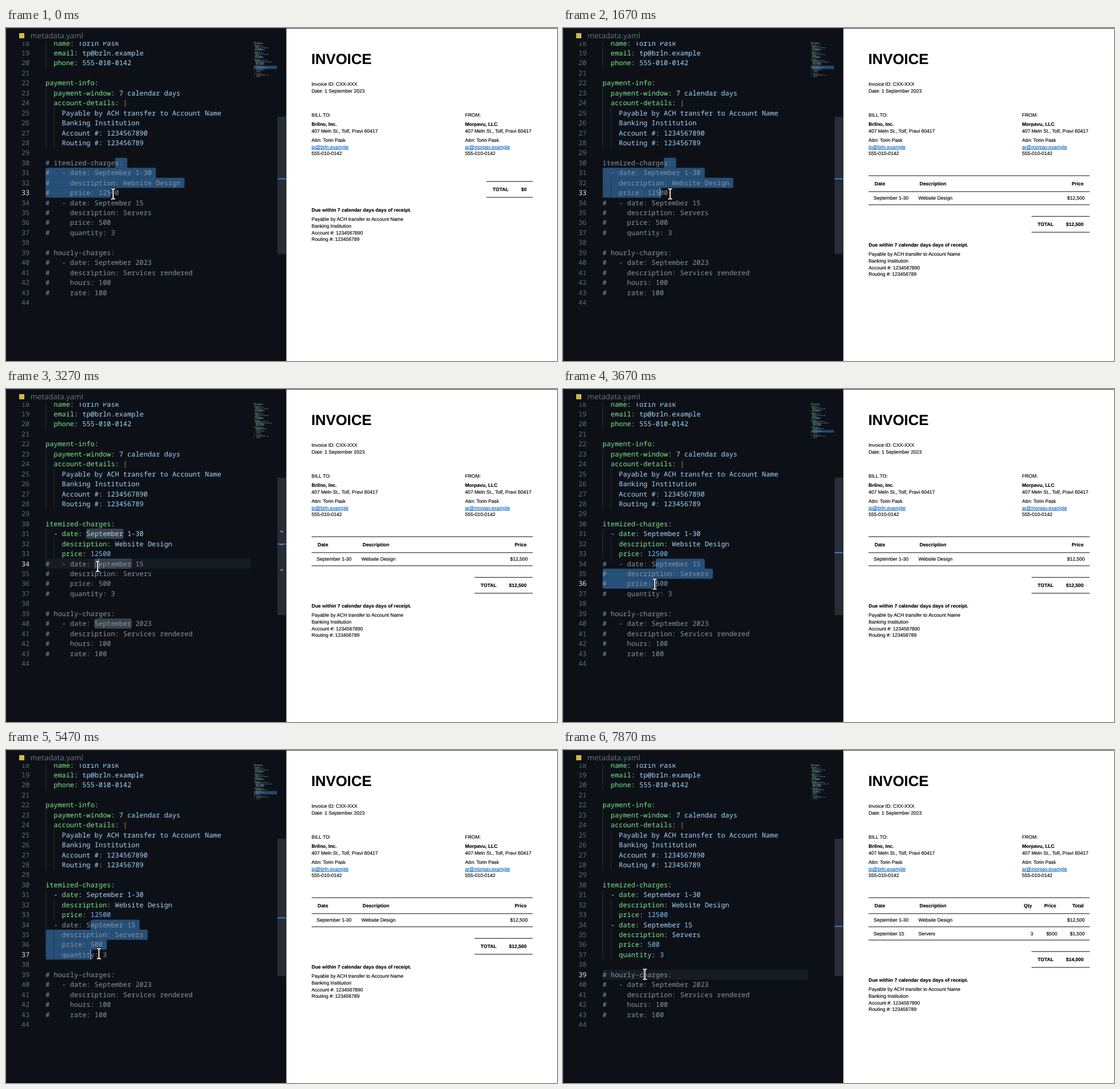
Write an HTML page that moves like this. It is 962 px wide and 582 px high and loops after 8 s.

```html
<!DOCTYPE html>
<html lang="en">
<head>
<meta charset="utf-8">
<title>Invoice from YAML</title>
<style>
  html, body { margin: 0; width: 100%; height: 100%; overflow: hidden; background: #0d1117; }
  svg { display: block; width: 962px; height: 582px; }
  text { white-space: pre; text-rendering: geometricPrecision; }
  .code { font: 500 11.9px "Noto Sans Mono", "DejaVu Sans Mono", monospace; fill: #c9d1d9; }
  .title { font: 13.2px "Open Sans", "Noto Sans", sans-serif; fill: #6b7482; }
  .doc { font: 8.5px "Liberation Sans", Arial, sans-serif; fill: #000; stroke: #000; stroke-width: .15; }
  .b { font-weight: bold; }
  .h1 { font-size: 25.6px; font-weight: bold; }
  .link { fill: #0563c1; stroke: #0563c1; text-decoration: underline; }
</style>
</head>
<body>
<svg id="stage" viewBox="0 0 962 582">
  <rect width="490" height="582" fill="#0d1117"/>
  <g id="editor"></g>
  <rect width="489" height="24" fill="#0d1117"/>
  <rect width="1" height="582" fill="#20252d"/>
  <rect width="489" height="1" fill="#20252d"/>
  <rect x="23" y="9" width="9" height="9" fill="#d6b84a"/>
  <text class="title" x="42.6" y="17.6">metadata.yaml</text>
  <rect x="489.5" width="473" height="582" fill="#fff"/>
  <rect x="489" width="473" height="1" fill="#30363d"/>
  <g id="invoice"></g>
  <g id="mouse" fill="none" stroke-linecap="square"></g>
</svg>
<script>
const LOOP = 8000, STEP = 1000 / 15;
const X0 = 69, CW = 7.14, LH = 17.44, TOP = 35, FIRST = 18, LAST = 44;
const NAME = 'Torin Pask', PHONE = '555-010-0142', STREET = '407 Meln St., Tolf, Pravi 60417';
const CLIENT_MAIL = 'tp@brln.example', OWN_MAIL = 'ar@morpav.example';
const PAYMENT = ['Payable by ACH transfer to Account Name', 'Banking Institution',
  'Account #: 1234567890', 'Routing #: 123456789'];

// Lines above the viewport, seen only in the minimap
const HIDDEN = ['---', 'invoice-id: CXX-XXX', 'date: 1 September 2023', '', 'company-info:',
  '  company: Morpavu, LLC', '  address: |', '    ' + STREET, '  name: ' + NAME,
  '  email: ' + OWN_MAIL, '  phone: ' + PHONE, '', 'client-info:', '  company: Brilno, Inc.',
  '  address: |', '    ' + STREET, '  attention:'];
const CODE = ['  name: ' + NAME, '  email: ' + CLIENT_MAIL, '  phone: ' + PHONE, '',
  'payment-info:', '  payment-window: 7 calendar days', '  account-details: |',
  ...PAYMENT.map(s => '    ' + s), '',
  'itemized-charges:', '  - date: September 1-30', '    description: Website Design', '    price: 12500',
  '  - date: September 15', '    description: Servers', '    price: 500', '    quantity: 3', '',
  'hourly-charges:', '  - date: September 2023', '    description: Services rendered',
  '    hours: 100', '    rate: 100', ''];

// First line, last line, time uncommented, time recoloured
const BLOCKS = [[30, 33, 1600, 1800], [34, 37, 5470, 5530], [39, 43, Infinity, Infinity]];
const BLINKS = [470, 930, 1400, 2070, 2600, 4670, 5130, 5930, 6470, 6930, 7400];
const PATH = [[0, 187, 290], [2530, 187, 290], [2930, 160, 310], [3400, 160, 310], [3670, 160, 341],
  [3870, 160, 352], [4270, 161, 356], [4330, 162.3, 356], [7070, 162.3, 356], [7270, 154, 371], [7730, 143, 392]];

const $ = id => document.getElementById(id);
const xAt = col => X0 + col * CW;
const topAt = n => TOP + (n - 19) * LH;
const mapY = n => 23.9 + (n - 1) * 1.45;
const rulerY = n => 262.6 + (n - 33) * 7.45;
const rect = (x, y, w, h, fill, more = '') =>
  `<rect x="${x}" y="${y}" width="${w}" height="${h}" fill="${fill}" ${more}/>`;
const text = (x, y, s, cls, more = '') => `<text class="${cls}" x="${x}" y="${y}" ${more}>${s}</text>`;
const span = (fill, s) => s ? `<tspan fill="${fill}">${s}</tspan>` : '';

function mouseAt(t) {
  t = Math.floor(t / STEP + 0.06) * STEP + 4;
  const i = PATH.findIndex(p => p[0] > t);
  if (i < 0) return PATH[PATH.length - 1].slice(1);
  const [a, b] = [PATH[i - 1], PATH[i]], k = (t - a[0]) / (b[0] - a[0]);
  return [a[1] + (b[1] - a[1]) * k, a[2] + (b[2] - a[2]) * k];
}

// Selection as [start line, start column, caret line, caret column]
function selectionAt(t) {
  if (t < 1600) return [30, 17, 33, 16];
  if (t < 3070) return [30, 15, 33, 14];
  if (t < 3470) return [34, 13, 34, 13];
  if (t < 5470) return [34, 13, 19 + Math.floor((mouseAt(t)[1] - TOP) / LH), 13];
  if (t < 7870) return [34, 11, 37, 11];
  return [39, 10, 39, 10];
}

function lineAt(n, t) {
  if (n < FIRST) return { s: HIDDEN[n - 1] };
  const s = CODE[n - FIRST], block = BLOCKS.find(b => n >= b[0] && n <= b[1]);
  if (!block) return { s };
  return { s: t < block[2] ? '# ' + s : s, grey: t < block[3], off: t < block[2] };
}

function tokens({ s, grey }) {
  if (grey) return [['#8b949e', s]];
  const [, pad, dash = '', key = '', rest] = s.match(/^(\s*)(- )?([\w-]+:)?(.*)$/);
  const tint = rest.trim() === '|' ? '#ff7b72' : key && /^ \d+$/.test(rest) ? '#79c0ff' : '#a5d6ff';
  return [['#c9d1d9', pad + dash], ['#7ee787', key.slice(0, -1)], ['#c9d1d9', key.slice(-1)], [tint, rest]];
}

function rounded(x, y, r, h, [tl, tr, br, bl]) {
  const b = y + h;
  return `<path fill="#264f78" d="M${x + tl} ${y}H${r - tr}Q${r} ${y} ${r} ${y + tr}V${b - br}` +
    `Q${r} ${b} ${r - br} ${b}H${x + bl}Q${x} ${b} ${x} ${b - bl}V${y + tl}Q${x} ${y} ${x + tl} ${y}Z"/>`;
}

function selection([l0, c0, l1, c1], t) {
  const rows = [];
  for (let n = l0; n <= l1; n++) {
    const s = lineAt(n, t).s;
    rows.push({ n, s, from: n === l0 ? c0 : 0, to: n === l1 ? c1 : s.length + 1 });
  }
  return rows.map(({ n, s, from, to }, i) => {
    const up = rows[i - 1], down = rows[i + 1], r = 3;
    const corners = [!up || from < up.from, !up || to > up.to, !down || to > down.to, !down].map(c => c ? r : 0);
    let out = rounded(xAt(from), topAt(n), xAt(to), LH + (down ? 0.3 : 0), corners);
    for (let c = from; c < Math.min(to, s.length); c++)
      if (s[c] === ' ') out += rect(xAt(c) + 3, topAt(n) + 8.8, 1.2, 1.2, '#45688c');
    return out;
  }).join('');
}

function minimap(t, [l0, , l1], hasRange) {
  let out = hasRange ? rect(433, mapY(l0), 40, (l1 - l0 + 1) * 1.45, '#234a70') : '';
  for (let n = 1; n < LAST; n++) {
    let col = 0;
    for (const [fill, s] of tokens(lineAt(n, t))) {
      for (const m of s.matchAll(/\S+/g))
        out += rect(433 + (col + m.index) * 0.72, mapY(n) + 0.2, m[0].length * 0.72, 0.95, fill, 'opacity=".5"');
      col += s.length;
    }
  }
  return out;
}

function editor(t) {
  const sel = selectionAt(t), [l0, c0, l1, c1] = sel;
  const hasRange = l0 !== l1 || c0 !== c1;
  let out = hasRange ? '' : rect(X0, topAt(l1), 358.5, LH, '#171c24');
  let rows = '', guides = '';
  for (let n = FIRST; n <= LAST; n++) {
    const line = lineAt(n, t), y = topAt(n) + 13;
    rows += text(41.2, y, span(n === l1 ? '#e6edf3' : '#636b76', String(n)), 'code', 'text-anchor="end"');
    rows += text(X0, y, tokens(line).map(k => span(...k)).join(''), 'code');
    if (!line.off)
      for (let c = 0; c < line.s.search(/\S|$/); c += 2)
        guides += rect(xAt(c), topAt(n), 1, LH, '#2a3038');
  }
  if (hasRange) out += selection(sel, t);
  out += guides;
  const words = t >= 3270 && t < 3470 ? [[31, 10], [34, 12], [40, 12]] : [];
  for (const [n, c] of words)
    out += rect(xAt(c), topAt(n) + 0.5, 9 * CW, LH - 1, '#3a4149', 'stroke="#4b535d" stroke-width=".8" rx="2"');
  out += rows;
  if (BLINKS.filter(b => b <= t).length % 2)
    out += rect(xAt(c1) - 0.4, topAt(l1), 1.6, LH, '#58a6ff');
  out += minimap(t, sel, hasRange) + rect(474, 155, 14.5, 240, '#272c35');
  for (const [n] of words) out += rect(479, rulerY(n), 5, 3, '#6e7681');
  return out + rect(474, rulerY(l1), 14.5, 2, '#3f7bcb');
}

function invoice(stage) {
  const right = 'text-anchor="end"';
  const doc = (x, y, s, cls = '', more) => text(x, y, s, 'doc ' + cls, more);
  const rule = (x, y) => rect(x, y, 919.5 - x, 1.1, '#222');
  const party = (x, head, firm, mail) => [[154.8, head], [171, firm, 'b'], [182.8, STREET],
    [199, 'Attn: ' + NAME], [210.8, mail, 'link'], [222.4, PHONE]]
    .map(([y, s, cls]) => doc(x, y, s, cls)).join('');

  let out = doc(533, 63.4, 'INVOICE', 'h1') + doc(533.5, 101, 'Invoice ID: CXX-XXX') +
    doc(533.5, 112.6, 'Date: 1 September 2023') +
    party(533.5, 'BILL TO:', 'Brilno, Inc.', CLIENT_MAIL) + party(801.5, 'FROM:', 'Morpavu, LLC', OWN_MAIL);

  if (stage) {
    out += [257.6, 285.4, 308.4].map(y => rule(533.5, y)).join('');
    out += doc(544, 275, 'Date', 'b') + doc(622.5, 275, 'Description', 'b') +
      doc(909, 275, stage > 1 ? 'Total' : 'Price', 'b', right) +
      doc(542.3, 300.2, 'September 1-30') + doc(620.5, 300.2, 'Website Design') + doc(911, 300.2, '$12,500', '', right);
  }
  if (stage > 1) {
    out += rule(533.5, 331.6) + doc(818.7, 275, 'Qty', 'b', right) + doc(861, 275, 'Price', 'b', right) +
      doc(542.3, 323.7, 'September 15') + doc(620.5, 323.7, 'Servers') + doc(821, 323.7, '3', '', right) +
      doc(863, 323.7, '$500', '', right) + doc(911, 323.7, '$1,500', '', right);
  }

  const dy = [0, 61, 84][stage], left = stage ? 818 : 839;
  out += rule(left, 267.7 + dy) + rule(left, 295.4 + dy) + doc(left + 10.8, 285.2 + dy, 'TOTAL', 'b') +
    doc(909, 285.2 + dy, ['$0', '$12,500', '$14,000'][stage], 'b', right) +
    doc(533.5, 320.8 + dy, 'Due within 7 calendar days days of receipt.', 'b');
  PAYMENT.forEach((s, i) => out += doc(533.5, 337.3 + dy + i * 11.7, s));
  return out;
}

const beam = 'M-2.6 -8.8H-1.4L0 -7.6L1.4 -8.8H2.6M0 -7.6V7.6M-2.6 8.8H-1.4L0 7.6L1.4 8.8H2.6';
$('mouse').innerHTML = `<path d="${beam}" stroke="#000" stroke-width="3.6"/>` +
  `<path d="${beam}" stroke="#fff" stroke-width="1.8"/>`;

const shown = {};
function put(id, html) {
  if (shown[id] !== html) $(id).innerHTML = shown[id] = html;
}

function draw(now) {
  const t = now % LOOP, [mx, my] = mouseAt(t);
  put('editor', editor(t));
  put('invoice', invoice((t >= 1670) + (t >= 5530)));
  $('mouse').setAttribute('transform', `translate(${mx} ${my})`);
}

const start = performance.now();
function tick() {
  draw(performance.now() - start);
  requestAnimationFrame(tick);
}
tick();
</script>
</body>
</html>
```
